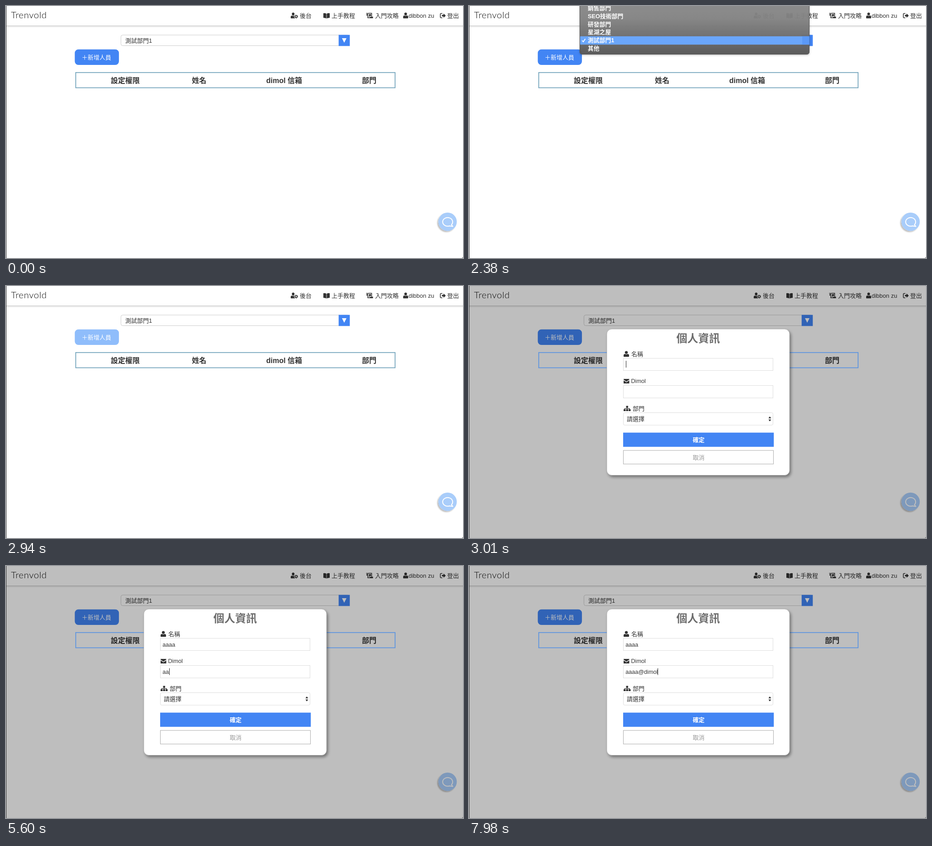
These frames come from a looping animation (1008 by 556 pixels, 8 s). An HTML page:

```html
<!DOCTYPE html>
<html lang="zh-Hant">
<head>
<meta charset="utf-8">
<title>人員管理</title>
<style>
html, body { margin: 0; width: 100%; height: 100%; overflow: hidden; background: #fff; }
svg { display: block; width: 100%; height: 100%; }
text { font: 13px "Liberation Sans", "Noto Sans CJK TC", "Noto Sans CJK", sans-serif; fill: #333; white-space: pre; }
.brand { font: 300 20.5px Lato, sans-serif; fill: #111; letter-spacing: .5px; }
.head { font-size: 16px; font-weight: 700; }
.title { font-size: 24px; font-weight: 700; fill: #6c6c6c; text-anchor: middle; }
.entry { font-size: 12.6px; }
.white { fill: #fff; }
.medium { font-weight: 500; }
.bold { font-weight: 700; }
.mid { text-anchor: middle; }
.item { fill: #fff; font-size: 12.8px; font-weight: 700; }
.blue { fill: #4285f4; }
.field { fill: #fff; stroke: #ddd; }
.icon { fill: #333; }
.line { fill: none; stroke: #333; stroke-width: 1.6; }
</style>
</head>
<body>
<svg viewBox="0 0 1008 556" preserveAspectRatio="none">
  <defs>
    <linearGradient id="menuFill" x1="0" y1="0" x2="0" y2="1">
      <stop offset="0" stop-color="#8c8c8c"/>
      <stop offset=".4" stop-color="#828282"/>
      <stop offset="1" stop-color="#565656"/>
    </linearGradient>
    <filter id="soft" x="-20%" y="-60%" width="140%" height="220%">
      <feDropShadow dx="0" dy="1" stdDeviation="2" flood-opacity=".3"/>
    </filter>
    <filter id="chatShadow" x="-30%" y="-30%" width="160%" height="160%">
      <feDropShadow dx="-2.5" dy="2.5" stdDeviation="1.3" flood-opacity=".25"/>
    </filter>
    <filter id="cardShadow" x="-10%" y="-10%" width="120%" height="120%">
      <feDropShadow dx="3" dy="4" stdDeviation="3" flood-opacity=".4"/>
    </filter>
    <g id="person">
      <circle cx="6" cy="3.3" r="3.2"/>
      <path d="M0 12V10Q0 6.8 3 6.8Q6 8.2 9 6.8Q12 6.8 12 10V12Q12 13 11 13H1Q0 13 0 12Z"/>
    </g>
  </defs>

  <rect width="1008" height="556" fill="#fff"/>
  <rect x="-8" y="-8" width="1024" height="51" fill="#fff" filter="url(#soft)"/>
  <text class="brand" x="11" y="27">Trenvold</text>

  <g class="icon">
    <use href="#person" transform="translate(628 14.5) scale(.9 .98)"/>
    <circle cx="640" cy="23.3" r="4.6" fill="#fff"/>
    <circle class="line" cx="640" cy="23.3" r="2.3"/>
    <circle cx="640" cy="23.3" r="3.5" fill="none" stroke="#333" stroke-width="1.3" stroke-dasharray="1.6 2.06"/>
    <path d="M700 16Q704 15.3 706.6 17V27.5Q704 26 700 26ZM714 16Q710 15.3 707.4 17V27.5Q710 26 714 26Z"/>
    <path class="line" d="M794.5 16.3H798M798 15.8V26H808.5M799 16H806.5V23"/>
    <path d="M800.5 18H805V22H802V24.5H800.5ZM795 18H797V21H795ZM803 23.5H809.5V27H803Z"/>
    <use href="#person" transform="translate(876 14.3) scale(.92 1)"/>
    <path class="line" d="M962.5 16.5H959.5Q958 16.5 958 18V24.5Q958 26 959.5 26H962.5"/>
    <path d="M961.5 19.5H965V16.5L970 21.2L965 26V23H961.5Z"/>
  </g>
  <text x="648" y="26">後台</text>
  <text x="718" y="26">上手教程</text>
  <text x="814" y="26">入門攻略</text>
  <text x="888" y="26">dibbon zu</text>
  <text x="973" y="26">登出</text>

  <rect x="253.5" y="64" width="504" height="23.5" rx="4" fill="#fff" stroke="#ccc"/>
  <text x="263" y="80.5">測試部門1</text>
  <rect class="blue" x="733.7" y="63.7" width="24.6" height="24.6"/>
  <path class="white" d="M741 71H751L746 81Z"/>
  <rect id="add" x="151.7" y="95.7" width="97.4" height="34.4" rx="8"/>
  <text class="white medium" x="167" y="118">＋新增人員</text>

  <text class="head" x="231" y="170">設定權限</text>
  <text class="head" x="410" y="170">姓名</text>
  <text class="head" x="574" y="170">dimol 信箱</text>
  <text class="head" x="785" y="170">部門</text>

  <g filter="url(#chatShadow)"><circle cx="974" cy="476" r="20.3" fill="#a9cdfa"/></g>
  <path d="M982.5 482.5A11 9.5 0 1 0 978 485.2L985.5 486.3Z" fill="none" stroke="#fff" stroke-width="2" stroke-linejoin="round"/>

  <rect id="shade" width="1008" height="556" opacity=".255"/>
  <rect id="frame" x="153.8" y="146.8" width="704.4" height="33.6" fill="none" stroke-width="1.8"/>

  <g id="menu">
    <rect x="244.5" y="-20" width="506" height="126.5" rx="5" fill="url(#menuFill)" fill-opacity=".95" stroke="#555" filter="url(#soft)"/>
    <rect x="245" y="66.8" width="505.5" height="18.4" fill="#6aa6fb"/>
    <rect x="735" y="66.8" width="15.5" height="18.4" fill="#5b99f6"/>
    <path d="M249.5 76L252 79L256.5 72.5" fill="none" stroke="#fff" stroke-width="1.8"/>
    <g id="items"></g>
  </g>

  <g id="dialog">
    <rect x="304" y="95" width="403" height="322.5" rx="11" fill="#fff" stroke="#999" stroke-width=".6" filter="url(#cardShadow)"/>
    <text class="title" x="505.5" y="124.3">個人資訊</text>
    <g class="icon">
      <use href="#person" x="341" y="143.3"/>
      <path d="M341 205H353.5V206.5L347.2 211L341 206.5ZM341 208.2L347.2 212.6L353.5 208.2V215H341Z"/>
      <path d="M346.5 264.5H351V268.5H346.5ZM341 272H345.5V276H341ZM346.5 272H351V276H346.5ZM352 272H356.5V276H352Z"/>
      <path class="line" d="M348.7 268V272M343.2 273V270.3H354.3V273" style="stroke-width:1.2"/>
    </g>
    <text x="358" y="154.5">名稱</text>
    <text class="entry" x="357.5" y="214">Dimol</text>
    <text x="361" y="275">部門</text>
    <rect class="field" x="340.5" y="159.5" width="330" height="27"/>
    <rect class="field" x="340.5" y="219.5" width="330" height="27.5"/>
    <rect class="field" x="340.5" y="279.5" width="330" height="27.5" rx="3"/>
    <text class="medium" x="348" y="298">請選擇</text>
    <path class="icon" d="M660.5 292L663.5 287.8L666.5 292ZM660.5 294.5L663.5 298.8L666.5 294.5Z"/>
    <rect class="blue" x="340" y="323.5" width="332.3" height="31.3"/>
    <text class="white bold mid" x="506.5" y="344.3">確定</text>
    <rect x="340.5" y="362.8" width="331" height="30" fill="#fff" stroke="#aaa"/>
    <text class="mid" x="506.5" y="383" style="fill:#999">取消</text>
    <text id="name" class="entry" x="345.3" y="177.5"></text>
    <text id="mail" class="entry" x="345.3" y="237.5"></text>
    <rect id="caret" width="1" height="15" fill="#222"/>
  </g>

  <rect width="1" height="556" fill="#3a3a3a"/>
  <path d="M1008 552.5V556H1004.5Q1008 556 1008 552.5Z" fill="#555"/>
</svg>
<script>
const LOOP = 8000;
const MENU_OPEN = 1330, MENU_CLOSE = 2520, MENU_FADE = 210;
const PRESS = 2870, DIALOG = 3010, MAIL_FOCUS = 5180, BLINK = 500;
const entries = {
  name: { text: "aaaa", keys: [4270, 4480, 4690, 4900], top: 165 },
  mail: { text: "aaaa@dimol", keys: [5390, 5600, 5740, 5950, 6510, 6720, 7000, 7210, 7490, 7700], top: 225.5 }
};

const $ = id => document.getElementById(id);
const show = (id, on) => { $(id).style.display = on ? "" : "none"; };

["銷售部門", "SEO技術部門", "研發部門", "星湖之屋", "測試部門1", "其他"].forEach((label, i) => {
  const item = document.createElementNS("http://www.w3.org/2000/svg", "text");
  item.setAttribute("class", "item");
  item.setAttribute("x", 262);
  item.setAttribute("y", 9 + i * 17.75);
  item.textContent = label;
  $("items").append(item);
});

function drawEntries(t) {
  for (const [id, { text, keys }] of Object.entries(entries))
    $(id).textContent = text.slice(0, keys.filter(k => k <= t).length);
  const focus = t < MAIL_FOCUS ? "name" : "mail";
  const { keys, top } = entries[focus];
  const start = focus === "name" ? DIALOG : MAIL_FOCUS;
  const last = Math.max(start, ...keys.filter(k => k <= t));
  const width = $(focus).textContent ? $(focus).getComputedTextLength() : 0;
  $("caret").setAttribute("x", Math.round(345.5 + width));
  $("caret").setAttribute("y", top);
  show("caret", (t - last) % (2 * BLINK) < BLINK);
}

function draw(t) {
  const open = t >= DIALOG;
  show("menu", t >= MENU_OPEN && t < MENU_CLOSE + MENU_FADE);
  $("menu").style.opacity = Math.min(1, 1 - (t - MENU_CLOSE) / MENU_FADE);
  $("add").setAttribute("fill", t >= PRESS && !open ? "#8fbdfb" : "#4285f4");
  $("frame").setAttribute("stroke", open ? "#5f95de" : "#75a5bd");
  show("shade", open);
  show("dialog", open);
  if (open) drawEntries(t);
}

function tick() {
  draw(performance.now() % LOOP);
  requestAnimationFrame(tick);
}
tick();
</script>
</body>
</html>
```
